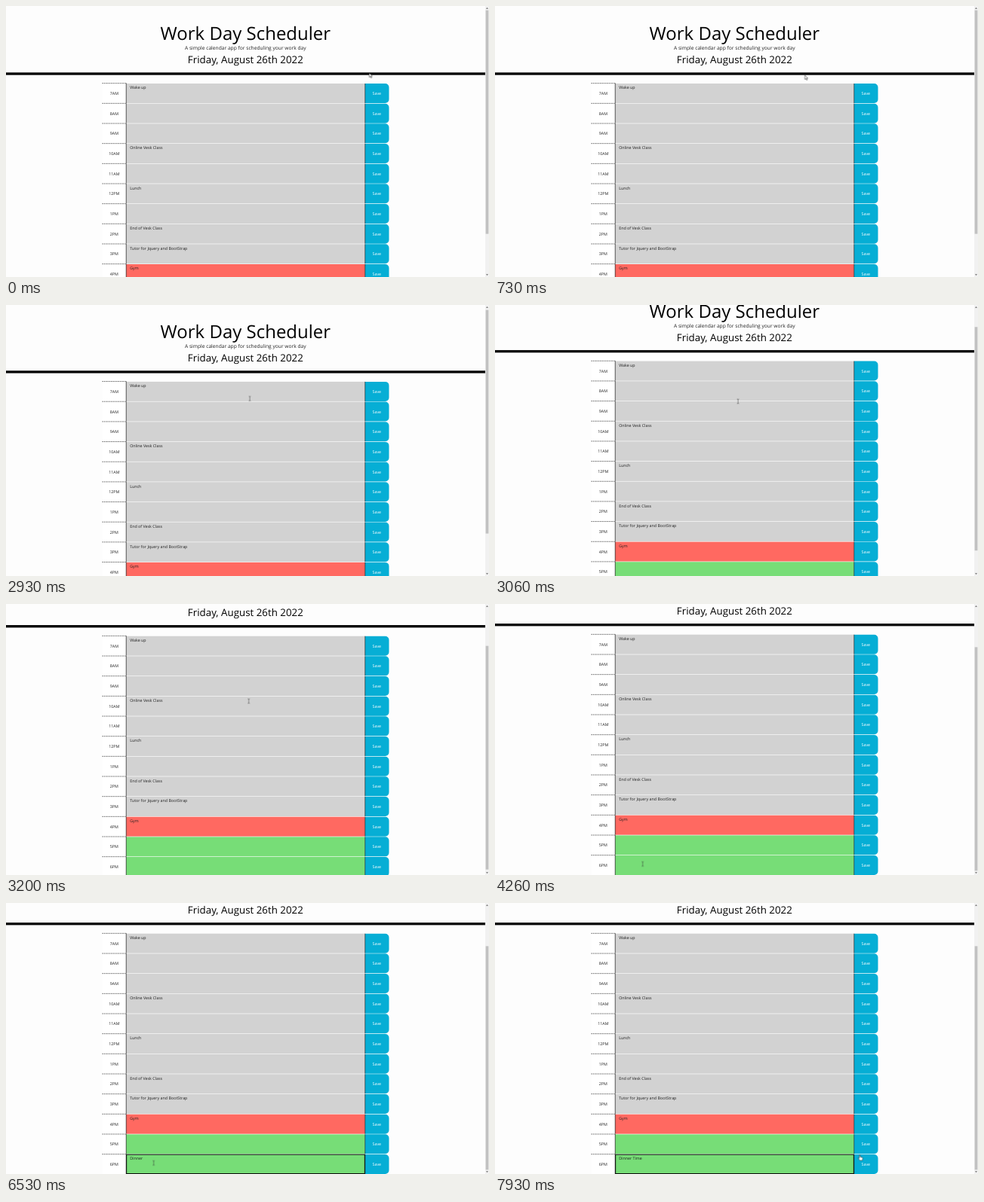
Recreate the animation shown at these times as an HTML page. Size 640 by 360 pixels, loop 8000 ms.

```html
<!DOCTYPE html>
<html lang="en">
<head>
<meta charset="utf-8">
<title>Work Day Scheduler</title>
<style>
html, body { margin: 0; width: 100%; height: 100%; overflow: hidden; background: #fdfdfd; }
svg { display: block; width: 100%; height: 100%; }
text {
  font: 16px "Open Sans", sans-serif;
  fill: #222;
  white-space: pre;
  text-rendering: geometricPrecision;
}
.mid { text-anchor: middle; }
.title { font-size: 72px; fill: #000; }
.lead { font-size: 20px; }
.date { font-size: 40px; fill: #000; }
.save { fill: #fff; }

#page { animation: scroll 8s infinite; }
#thumb { animation: thumb 8s infinite; }
#focus { animation: focus 8s step-end infinite; }
#pointer { animation: move 8s infinite; }
#arrow { animation: arrow 8s step-end infinite; }
#beam { animation: beam 8s step-end infinite; }
#hand { animation: hand 8s step-end infinite; }

@keyframes scroll {
  0% { transform: translateY(0); }
  36.31% { transform: translateY(0); animation-timing-function: cubic-bezier(.333, 0, .667, 1); }
  40.46%, 100% { transform: translateY(-187px); }
}
@keyframes thumb {
  0% { transform: translateY(0); }
  36.31% { transform: translateY(0); animation-timing-function: cubic-bezier(.333, 0, .667, 1); }
  40.46%, 100% { transform: translateY(155px); }
}
@keyframes focus {
  0% { visibility: hidden; }
  60%, 100% { visibility: visible; }
}
@keyframes move {
  0%, .75% { transform: translate(1444px, 267px); animation-timing-function: ease-in-out; }
  18.75%, 31.25% { transform: translate(963px, 286px); animation-timing-function: ease-in-out; }
  35%, 36.7% { transform: translate(969px, 373px); }
  40%, 42% { transform: translate(965px, 387px); animation-timing-function: ease-in-out; }
  52.75%, 94.5% { transform: translate(587px, 1036px); animation-timing-function: ease-in-out; }
  98.75%, 100% { transform: translate(1450px, 1004px); }
}
@keyframes arrow {
  0% { visibility: visible; }
  33%, 100% { visibility: hidden; }
}
@keyframes beam {
  0% { visibility: hidden; }
  33% { visibility: visible; }
  98.1%, 100% { visibility: hidden; }
}
@keyframes hand {
  0% { visibility: hidden; }
  98.1%, 100% { visibility: visible; }
}
</style>
</head>
<body>
<svg viewBox="0 0 1920 1080" preserveAspectRatio="none">
  <rect width="1920" height="1080" fill="#fdfdfd"/>
  <g id="page">
    <text class="mid title" x="952" y="135">Work Day Scheduler</text>
    <text class="mid lead" x="952" y="175">A simple calendar app for scheduling your work day</text>
    <text class="mid date" x="952" y="229">Friday, August 26th 2022</text>
    <rect y="265" width="1905" height="10"/>
    <g id="rows"></g>
    <rect id="focus" x="479" y="1189.5" width="947" height="76" fill="none" stroke="#0a0a0a" stroke-width="3"/>
    <text id="typed" x="492.5" y="1211"></text>
    <rect id="caret" y="1195" width="1.5" height="20" fill="#222"/>
  </g>

  <rect x="1905" width="15" height="1080" fill="#f1f1f1"/>
  <rect id="thumb" x="1907" y="17" width="11" height="891" fill="#c1c1c1"/>
  <path d="M1908 11l4.500-5 4.500 5zM1908 1069l4.500 5 4.500-5z" fill="#666"/>

  <g id="pointer">
    <path id="arrow" d="M0 0V17L4 13.500 7 20 10 18.500 7 12.500H12Z" fill="#fff" stroke="#111" stroke-width="1.500"/>
    <path id="beam" d="M-4 -9H-1L0 -8 1 -9H4M0 -8V8M-4 9H-1L0 8 1 9H4" fill="none" stroke="#333" stroke-width="1.500"/>
    <path id="hand" d="M-2 1Q0 -2 2 1V8L10 10Q12 11 12 14L10 22H0L-6 13Q-6 10 -2 13Z" fill="#fff" stroke="#111" stroke-width="1.500"/>
  </g>
</svg>
<script>
const LOOP = 8000, TOP = 307, ROW = 80, FOCUS = 4800;
const plans = {
  7: 'Wake up', 10: 'Online Vesk Class', 12: 'Lunch',
  14: 'End of Vesk Class', 15: 'Tutor for Jquery and BootStrap', 16: 'Gym'
};
const entry = 'Dinner Time';
const keys = [5200, 5330, 5460, 5600, 5730, 5860, 6600, 6730, 7000, 7200, 7400];
const $ = id => document.getElementById(id);

function add(tag, attrs, label = '') {
  const el = document.createElementNS('http://www.w3.org/2000/svg', tag);
  for (const name in attrs) el.setAttribute(name, attrs[name]);
  el.textContent = label;
  $('rows').append(el);
}

function addRow(hour) {
  const y = TOP + (hour - 7) * ROW;
  const fill = hour < 16 ? '#d2d2d2' : hour === 16 ? '#ff6961' : '#77dd77';
  const name = (hour > 12 ? hour - 12 : hour) + (hour < 12 ? 'AM' : 'PM');
  add('rect', { x: 382.5, y, width: 95, height: ROW, fill: '#fff' });
  add('path', { d: `M382.5 ${y + 1}h95`, stroke: '#000', 'stroke-width': 2, 'stroke-dasharray': '4 3' });
  add('text', { class: 'mid', x: 430, y: y + 47 }, name);
  add('rect', { x: 477.5, y: y + 2, width: 950, height: ROW - 2, fill });
  add('rect', { x: 476.5, y: y + 1, width: 2, height: ROW - 1, fill: '#111' });
  add('text', { x: 492.5, y: y + 24 }, plans[hour]);
  add('path', { d: `M1427.5 ${y + 2}h80a15 15 0 0 1 15 15v48a15 15 0 0 1 -15 15h-80z`, fill: '#06aed5' });
  add('rect', { x: 1426.5, y: y + 2, width: 2, height: ROW - 2, fill: '#222' });
  add('text', { class: 'mid save', x: 1474, y: y + 47 }, 'Save');
}

for (let hour = 7; hour <= 18; hour++) addRow(hour);

let start;
function draw(now) {
  start ??= now;
  const t = (now - start) % LOOP;
  const count = keys.filter(k => k <= t).length;
  const last = count ? keys[count - 1] : FOCUS;
  const typed = $('typed');
  typed.textContent = entry.slice(0, count);
  $('caret').setAttribute('x', 493 + (count ? typed.getComputedTextLength() : 0));
  // The caret restarts its blink on every key.
  const on = t >= FOCUS && (t - last) % 1000 < 500;
  $('caret').style.visibility = on ? 'visible' : 'hidden';
  requestAnimationFrame(draw);
}
requestAnimationFrame(draw);
</script>
</body>
</html>
```
